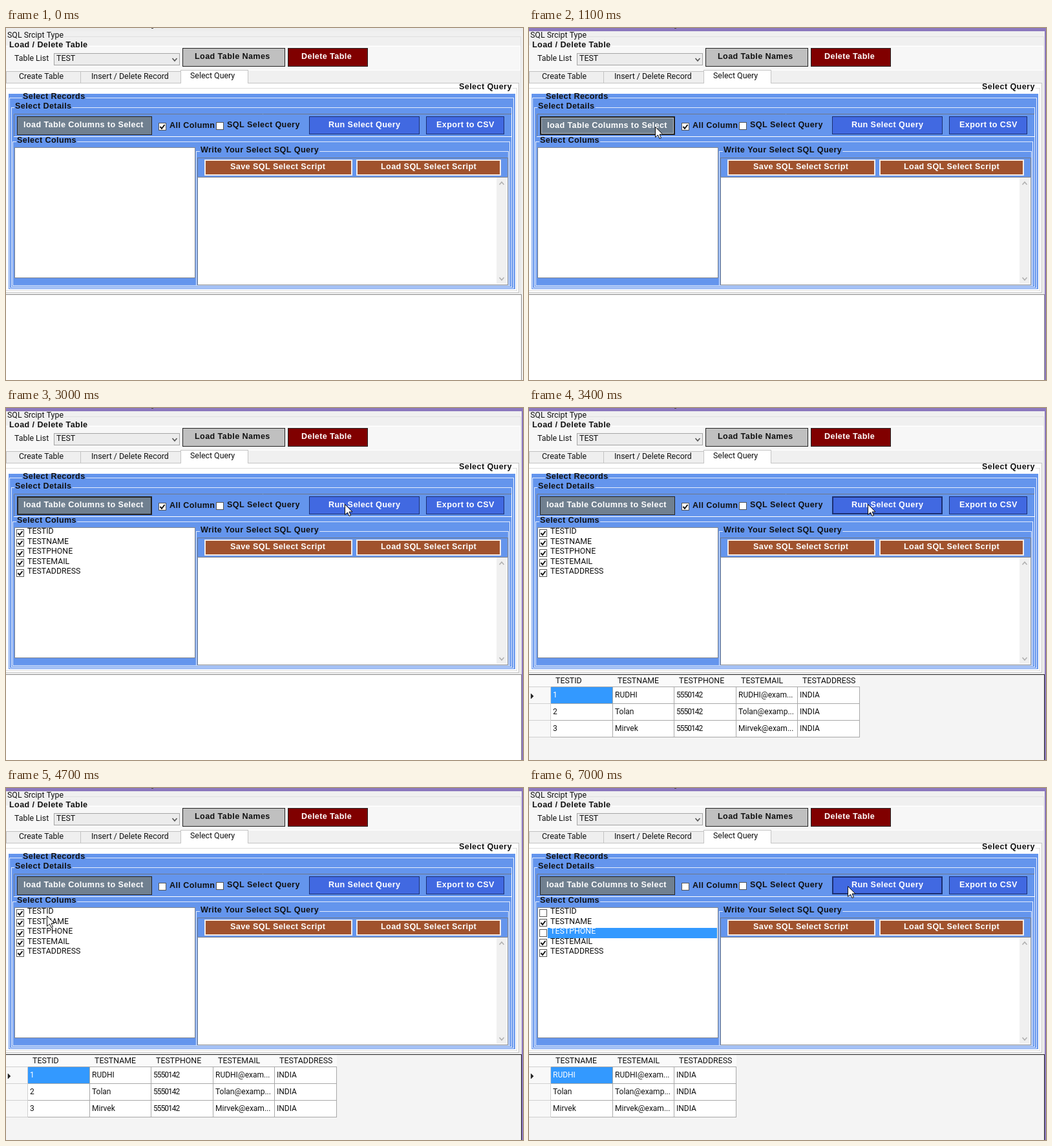
Recreate the animation shown at these times as an HTML page with a canvas. Size 800 by 546 pixels, loop 7100 ms.

```html
<!DOCTYPE html>
<html lang="en">
<head>
<meta charset="utf-8">
<title>Select Query</title>
<style>
html, body { margin: 0; width: 100%; height: 100%; overflow: hidden; }
canvas { display: block; }
</style>
</head>
<body>
<canvas id="stage" width="800" height="546"></canvas>
<script>
const ctx = document.getElementById('stage').getContext('2d');
const LOOP = 7100, STEP = 100;
const BLUE = '#6495ed', ROYAL = '#4169e1', SIENNA = '#a0522d', PICK = '#3399ff';
const PLAIN = '12.4px Roboto, sans-serif';
const SMALL = '12px Roboto, sans-serif';
const BOLD = 'bold 12.6px "Liberation Sans", Arial, sans-serif';

const fields = ['TESTID', 'TESTNAME', 'TESTPHONE', 'TESTEMAIL', 'TESTADDRESS'];
const records = [
  ['1', 'RUDHI', '5550142', 'RUDHI@exam...', 'INDIA'],
  ['2', 'Tolan', '5550142', 'Tolan@examp...', 'INDIA'],
  ['3', 'Mirvek', '5550142', 'Mirvek@exam...', 'INDIA']
];

// Pointer stops: time, x, y
const stops = [
  [100, 430, 546], [800, 200, 156], [1000, 195, 153], [1900, 195, 153],
  [2700, 520, 151], [3000, 524, 149], [3400, 524, 149], [3900, 260, 170],
  [4200, 241, 152], [4400, 241, 152], [4700, 63, 198], [5000, 56, 194],
  [5200, 56, 194], [5600, 82, 220], [6000, 82, 220], [6700, 493, 152]
];

function box(x, y, w, h, fill, border) {
  if (fill) {
    ctx.fillStyle = fill;
    ctx.fillRect(x, y, w, h);
  }
  if (border) {
    ctx.strokeStyle = border;
    ctx.lineWidth = 1;
    ctx.strokeRect(x + .5, y + .5, w - 1, h - 1);
  }
}

function path(points, color, width = 1, fill) {
  ctx.beginPath();
  for (let i = 0; i < points.length; i += 2) ctx.lineTo(points[i], points[i + 1]);
  if (fill) {
    ctx.closePath();
    ctx.fillStyle = fill;
    ctx.fill();
  }
  ctx.strokeStyle = color;
  ctx.lineWidth = width;
  ctx.stroke();
}

// x is the left edge and y the middle of the line
function text(str, x, y, font = PLAIN, color = '#111', spacing) {
  ctx.font = font;
  ctx.letterSpacing = (spacing ?? (font === BOLD ? .4 : 0)) + 'px';
  ctx.fillStyle = color;
  ctx.fillText(str, x, Math.round(y + 3.4));
}

function group(label, x, y, right, bottom, labelX, back, line = '#e4ecfc', font = BOLD) {
  box(x, y + 1, right - x, bottom - y - 1, null, line);
  ctx.font = font;
  ctx.letterSpacing = font === BOLD ? '.4px' : '0px';
  box(labelX - 1, y, ctx.measureText(label).width + 2, 3, back);
  text(label, labelX, y, font);
}

function button(label, x, y, w, h, fill, textX, { color = '#fff', border = '#222', focus, down } = {}) {
  box(x, y, w, h, fill, border);
  if (focus) {
    box(x + 1, y + 1, w - 2, h - 2, null, border);
    if (down) box(x + 2, y + 2, w - 4, h - 4, null, '#b8c0c8');
  }
  const shift = down ? 1 : 0;
  text(label, textX + shift, y + h / 2 - .5 + shift, BOLD, color);
}

function checkbox(x, y, checked) {
  box(x, y, 12, 12, '#fff', '#555');
  if (checked) path([x + 2.5, y + 6, x + 5, y + 9, x + 9.5, y + 3], '#111', 2);
}

function chevron(x, y, dir, color) {
  path([x - 3.5, y - 2 * dir, x, y + 2 * dir, x + 3.5, y - 2 * dir], color, 1.6);
}

function drawHeader(active) {
  box(0, 0, 800, 546, '#f0f0f0');
  box(0, 0, 800, 5, active ? '#8c78be' : '#ededed');
  box(225, 0, 3, 1, '#444');
  group('SQL Srcipt Type', -2, 12, 797, 600, 2, '#f0f0f0', '#e0e0e0', PLAIN);
  box(0, 27, 796, 39, '#f7f7f7');
  group('Load / Delete Table', -2, 27, 796, 66, 5, '#f4f4f4', '#fff');
  text('Table List', 13, 48);
  box(74, 39, 195, 19, '#ececec', '#a5a5a5');
  text('TEST', 78, 48);
  chevron(261, 49, 1, '#555');
  button('Load Table Names', 273, 31, 159, 29, '#c0c0c0', 292, { color: '#111' });
  button('Delete Table', 436, 31, 124, 29, '#800000', 457);
}

function drawTabs() {
  box(0, 67, 116, 19, '#efefef', '#c4c4c4');
  box(115, 67, 156, 19, '#efefef', '#c4c4c4');
  box(-1, 85, 795, 326, '#fff', '#c4c4c4');
  box(270, 65, 105, 21, '#fff', '#c4c4c4');
  box(271, 84, 103, 3, '#fff');
  text('Create Table', 20, 76);
  text('Insert / Delete Record', 132, 76);
  text('Select Query', 285, 75);
  group('Select Query', -2, 92, 791, 408, 701, '#fff', '#dcdcdc');
}

function drawQueryPanel(s) {
  box(4, 102, 784, 303, BLUE);
  group('Select Records', 5, 107, 786, 404, 26, BLUE);
  group('Select Details', 8, 122, 783, 402, 14, BLUE);

  box(12, 133, 771, 36, BLUE, '#fff');
  path([12.5, 168, 12.5, 133.5, 782, 133.5], '#707888');
  button('load Table Columns to Select', 17, 137, 209, 29, '#708090', 27,
    { focus: s.focus === 'load', down: s.down === 'load' });
  checkbox(236, 147, s.all);
  text('All Column', 253, 152, BOLD);
  checkbox(325, 146, false);
  text('SQL Select Query', 342, 151, BOLD);
  button('Run Select Query', 469, 137, 171, 28, ROYAL, 499,
    { border: '#1c2f70', focus: s.focus === 'run', down: s.down === 'run' });
  button('Export to CSV', 650, 137, 121, 28, ROYAL, 666, { border: '#1c2f70' });

  group('Select Colums', 10, 175, 780, 400, 17, BLUE);
  box(13, 185, 280, 203, '#fff', '#828790');
  if (s.loaded) fields.forEach((name, i) => {
    const y = 192 + 15.4 * i, picked = i === s.picked;
    if (picked) box(29, Math.round(y - 6), 262, 16, PICK);
    checkbox(16, Math.round(y - 4), s.checked(i));
    text(name, 33, y, PLAIN, picked ? '#fff' : '#111');
  });

  group('Write Your Select SQL Query', 294, 190, 778, 400, 301, BLUE);
  box(296, 201, 481, 31, BLUE, '#707888');
  for (const [label, x, w, textX] of [
    ['Save SQL Select Script', 307, 229, 347],
    ['Load SQL Select Script', 542, 224, 580]
  ]) {
    box(x, 204, w, 25, '#f4ece8');
    box(x + 2, 206, w - 4, 21, SIENNA);
    text(label, textX, 216, BOLD, '#fff');
  }
  box(296, 231, 481, 168, '#fff', '#828790');
  box(759, 232, 16, 165, '#f0f0f0');
  chevron(767, 241, -1, '#b0b0b0');
  chevron(767, 389, 1, '#b0b0b0');
}

function drawResult(columns) {
  box(-1, 413, 799, 140, columns ? '#f4f4f4' : '#fff', columns ? '#222' : '#8c8c8c');
  if (!columns) return;
  const edge = i => 34 + Math.round(95.6 * i);
  box(0, 414, edge(columns.length), 19, '#fafafa');
  columns.forEach((field, i) => {
    text(fields[field], edge(i) + 7, 424);
    records.forEach((record, r) => {
      const picked = !i && !r, y = 433 + 26 * r;
      box(edge(i) - 1, y - 1, edge(i + 1) - edge(i) + 1, 27, picked ? PICK : '#fff', '#a8a8a8');
      text(record[field], edge(i) + 3, y + 13, SMALL, picked ? '#fff' : '#111', field === 2 ? -1 : 0);
    });
  });
  for (let r = 0; r < 3; r++) box(-1, 432 + 26 * r, 35, 27, '#f8f8f8', '#d0d0d0');
  path([3, 443, 7, 447, 3, 451], '#222', .5, '#222');
}

function drawPointer(t) {
  if (t < stops[0][0]) return;
  const next = stops.findIndex(stop => stop[0] > t);
  const to = stops[next < 0 ? stops.length - 1 : next];
  const from = next < 0 ? to : stops[next - 1];
  const k = next < 0 ? 1 : (t - from[0]) / (to[0] - from[0]);
  const ease = k * k * (3 - 2 * k);
  ctx.save();
  ctx.translate(from[1] + (to[1] - from[1]) * ease + .5, from[2] + (to[2] - from[2]) * ease + .5);
  path([0, 0, 0, 16, 4, 12.5, 6.5, 18, 9, 17, 6.5, 11.5, 11.5, 11.5, 0, 0], '#111', 1, '#fff');
  ctx.restore();
}

function stateAt(t) {
  const during = (a, b) => t >= a && t < b;
  return {
    active: t >= 1000,
    loaded: t >= 1400,
    all: t < 4300,
    focus: during(1000, 3200) ? 'load' : during(3200, 4200) || t >= 6800 ? 'run' : '',
    down: during(1000, 1200) ? 'load' : during(3200, 3300) || during(6800, 6900) ? 'run' : '',
    picked: t < 5000 ? -1 : t < 5600 ? 0 : 2,
    checked: i => !(i === 0 && t >= 5000 || i === 2 && t >= 5600),
    columns: t < 3400 ? null : t < 6900 ? [0, 1, 2, 3, 4] : [1, 3, 4]
  };
}

function render(now) {
  const t = Math.floor(now / STEP) * STEP % LOOP;
  const state = stateAt(t);
  drawHeader(state.active);
  drawTabs();
  drawQueryPanel(state);
  drawResult(state.columns);
  if (state.active) box(798, 0, 2, 546, '#8c78be');
  drawPointer(t);
  requestAnimationFrame(render);
}
requestAnimationFrame(render);
</script>
</body>
</html>
```
